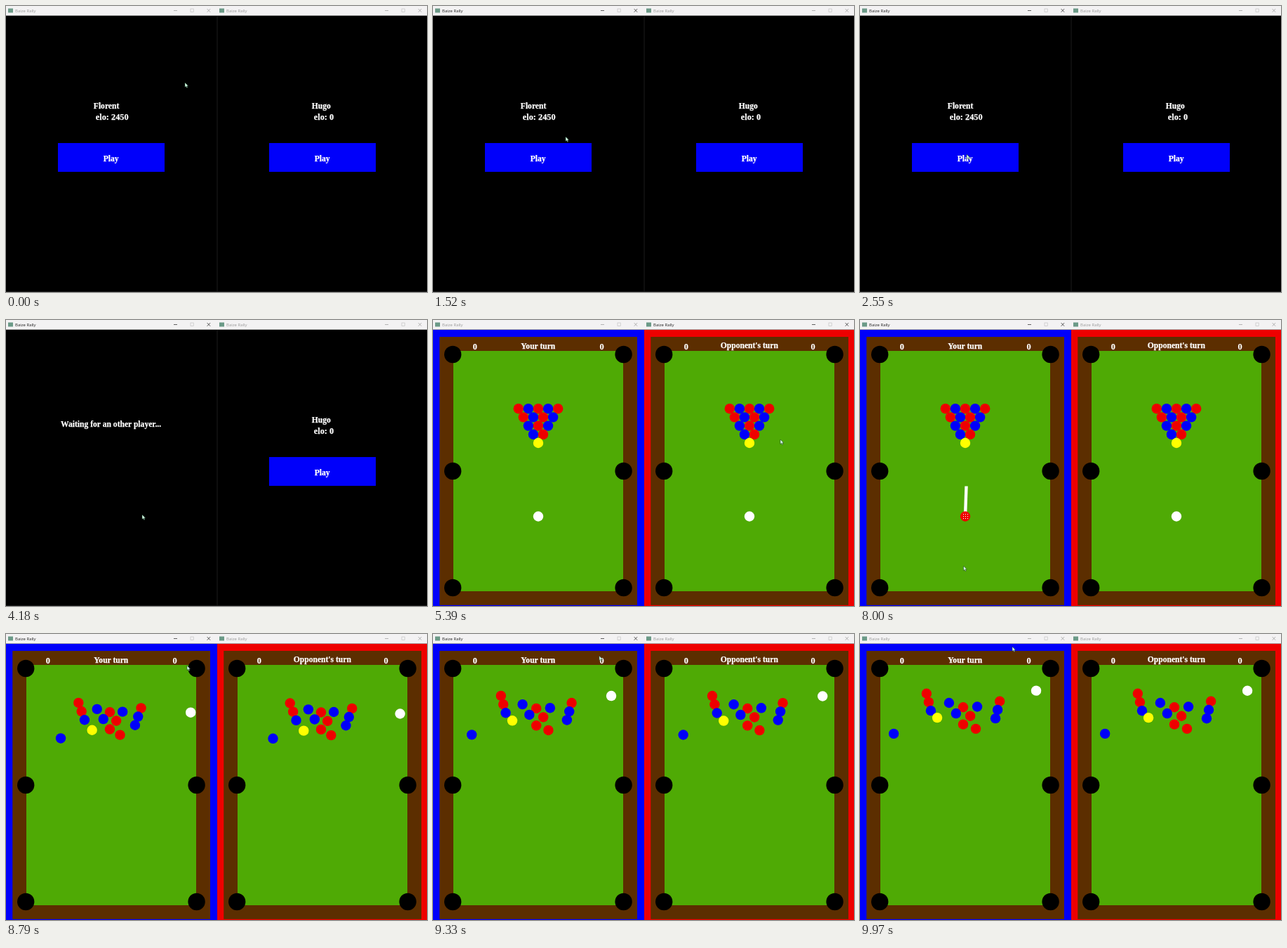
An HTML page that plays this animation: 600x407 px, repeating every 10000 ms.

```html
<!DOCTYPE html>
<html>
<head>
<meta charset="utf-8">
<style>
  html, body { margin: 0; width: 100%; height: 100%; overflow: hidden; background: #000; }
  svg { display: block; width: 600px; height: 407px; }
  text { font: bold 11.6px "Liberation Serif", serif; fill: #fff; stroke: #fff; stroke-width: .25; }
  .digits { font-size: 12.3px; }
  .title { font: 6px "Open Sans", sans-serif; fill: currentColor; stroke: none; }
  .mid { text-anchor: middle; }
</style>
</head>
<body>
<svg id="stage" viewBox="0 0 600 407"></svg>
<script>
const LOOP = 10000, FOCUS = 580, WAIT = 2790, START = 4880, PRESS = 7790, RELEASE = 8220, HIT = 8310, BLUR = 9880;
const DECAY = 2.3, BOUNCE = 0.685, LAG = 20;
const RED = '#ee0000', BLUE = '#0000fa', R = 7.2;
const HOME = [150, 279.5], CONTACT = [152.5, 190], CUSHION = [263.5, 111.5], REST = [251, 80.5];

// Pointer stops: time, x, y
const pointer = [
  [880, 255, 109], [1520, 189, 186], [2000, 152, 211], [3000, 152, 211], [3300, 261, 170],
  [4000, 62, 150], [4180, 194, 277], [4610, 458, 212], [START, 458, 212], [5390, 495, 170],
  [6360, 440, 262], [6760, 440, 262], [PRESS, 150, 281], [8000, 147.5, 350], [RELEASE, 147.5, 350],
  [8790, 258, 45], [9850, 217, 18]
];

const mix = (a, b, k) => a.map((v, i) => v + (b[i] - v) * k);

// The front of the rack takes the kick; the rows behind it fan out from their middle.
const front = [[-95, -21], [8, -28], [-40, -56]];
const fan = (row, v) => [(24 + 4 * row) * v * Math.abs(v) - 3, 5.5 * v - 14 * v * v - 22];
const fills = { R: RED, B: BLUE, Y: '#ffff00' };
const rack = ['RBRBR', 'RBRB', 'BRB', 'BR', 'Y'].flatMap((colours, row) => [...colours].map((c, i) => ({
  fill: fills[c],
  at: [121.8 + row * 7.05 + i * 14.1, 126.2 + row * 12.2],
  push: row < 3 ? fan(row, 2 * i / (4 - row) - 1) : front[(row - 3) * 2 + i]
})));

const $ = id => document.getElementById(id);
const show = (id, on) => $(id).setAttribute('display', on ? 'inline' : 'none');
const place = (el, at) => el.setAttribute('transform', `translate(${at})`);
const rect = (x, y, w, h, fill) => `<rect x="${x}" y="${y}" width="${w}" height="${h}" fill="${fill}"/>`;
const text = (x, y, s, cls = '') => `<text x="${x}" y="${y}" class="${cls}">${s}</text>`;
const circle = (x, y, r, fill, cls = '') => `<circle cx="${x}" cy="${y}" r="${r}" fill="${fill}" class="${cls}"/>`;

const bar = id => `<g id="${id}bar">${rect(0, 0, 301, 13.7, '#f3f2f3')}${rect(3, 3.5, 7, 6, '#6b9a87')}
  ${text(13, 8.8, 'Baize Rally', 'title')}
  <g fill="none" stroke="currentColor" stroke-width=".7"><path d="M239 6.5h5M286.6 4l4.6 4.8m0-4.8l-4.6 4.8"/>
  <rect x="263" y="4" width="4.2" height="4.6" stroke="#c4c4c4"/></g></g>`;

const menu = (id, name, x, elo) => `<g id="${id}menu">${text(x, 146, name)}${text(x + 3, 162, 'elo: ' + elo, 'digits')}
  ${rect(74, 195, 152, 41, BLUE)}${text(149.6, 220.6, 'Play', 'mid')}</g>`;

function table(id, edge, label, labelY) {
  const pockets = [49, 215, 381].map(y => circle(28.2, y, 12.2, '#000') + circle(271.6, y, 12.2, '#000'));
  return `<g id="${id}table">${rect(0, 14, 301, 393, edge)}${rect(9.3, 24, 281.7, 381.8, '#5c2e00')}
    ${rect(29, 44, 242, 342, '#4faa05')}${pockets.join('')}
    ${text(59.8, 42, '0', 'mid digits')}${text(240.5, 42, '0', 'mid digits')}${text(149.8, labelY, label, 'mid')}
    <line id="${id}stick" stroke="#fff" stroke-width="4.4"/>
    ${rack.map(b => circle(0, 0, R, b.fill, 'ball')).join('')}
    <g id="${id}cue">${circle(0, 0, R, '#fff')}</g></g>`;
}

$('stage').innerHTML = `${rect(0, 0, 600, 407, '#000')}
  <path d="M301 14V407M0 406.5H600" stroke="#1c1c1c"/>
  <g>${menu('L', 'Florent', 124.8, 2450)}
    <g id="waiting">${text(78, 151.5, 'Waiting for an other player...')}</g>
    ${table('L', BLUE, 'Your turn', 41)}${bar('L')}</g>
  <g transform="translate(301)">${menu('R', 'Hugo', 134.8, 0)}
    ${table('R', RED, "Opponent's turn", 39.5)}${bar('R')}</g>
  <path id="arrow" d="M0 0V6.6L1.6 5.2L2.7 7.6L3.8 7L2.8 4.8H4.8Z" fill="#d4ffe6" stroke="#12301f" stroke-width=".5"/>`;
$('Lcue').innerHTML += `<path id="dots" d="M-3 -3h7M-3 0h7M-3 3h7" stroke="#fff" stroke-dasharray="1 2"/>`;

function pointerAt(t) {
  const i = pointer.findIndex(p => p[0] > t);
  if (i < 1) return pointer.at(i).slice(1);
  const a = pointer[i - 1], b = pointer[i], k = (t - a[0]) / (b[0] - a[0]);
  return mix(a, b, k * k * (3 - 2 * k)).slice(1);
}

// Share of the rolled distance covered, slowing by friction
function roll(t) {
  const part = ms => 1 - Math.exp(-DECAY * ms / 1000);
  return t < HIT ? 0 : part(t - HIT) / part(LOOP - HIT);
}

function cueAt(t) {
  if (t < RELEASE) return HOME;
  if (t < HIT) return mix(HOME, CONTACT, (t - RELEASE) / (HIT - RELEASE));
  const s = roll(t);
  return s < BOUNCE ? mix(CONTACT, CUSHION, s / BOUNCE) : mix(CUSHION, REST, (s - BOUNCE) / (1 - BOUNCE));
}

function moveBalls(id, t) {
  const s = roll(t);
  $(id + 'table').querySelectorAll('.ball').forEach((el, i) =>
    place(el, rack[i].at.map((v, axis) => v + rack[i].push[axis] * s)));
  place($(id + 'cue'), cueAt(t));
}

function draw(t) {
  const playing = t >= START, aiming = t >= PRESS && t < RELEASE, tip = pointerAt(t);
  show('Lmenu', t < WAIT);
  show('waiting', t >= WAIT && !playing);
  show('Rmenu', !playing);
  show('Ltable', playing);
  show('Rtable', playing);
  const tint = on => on ? '#222' : '#9a9a9a';
  $('Lbar').style.color = tint((t >= FOCUS && !playing) || (t >= PRESS && t < BLUR));
  $('Rbar').style.color = tint(playing && t < PRESS);

  moveBalls('L', t);
  moveBalls('R', t - LAG);
  show('dots', aiming);
  show('Lstick', aiming);
  $('Lcue').firstElementChild.setAttribute('fill', aiming ? RED : '#fff');
  const [x2, y2] = mix(HOME, tip, -0.61);
  Object.entries({ x1: HOME[0], y1: HOME[1], x2, y2 }).forEach(([k, v]) => $('Lstick').setAttribute(k, v));
  place($('arrow'), tip);
}

function tick() {
  draw(performance.now() % LOOP);
  requestAnimationFrame(tick);
}
tick();
</script>
</body>
</html>
```
